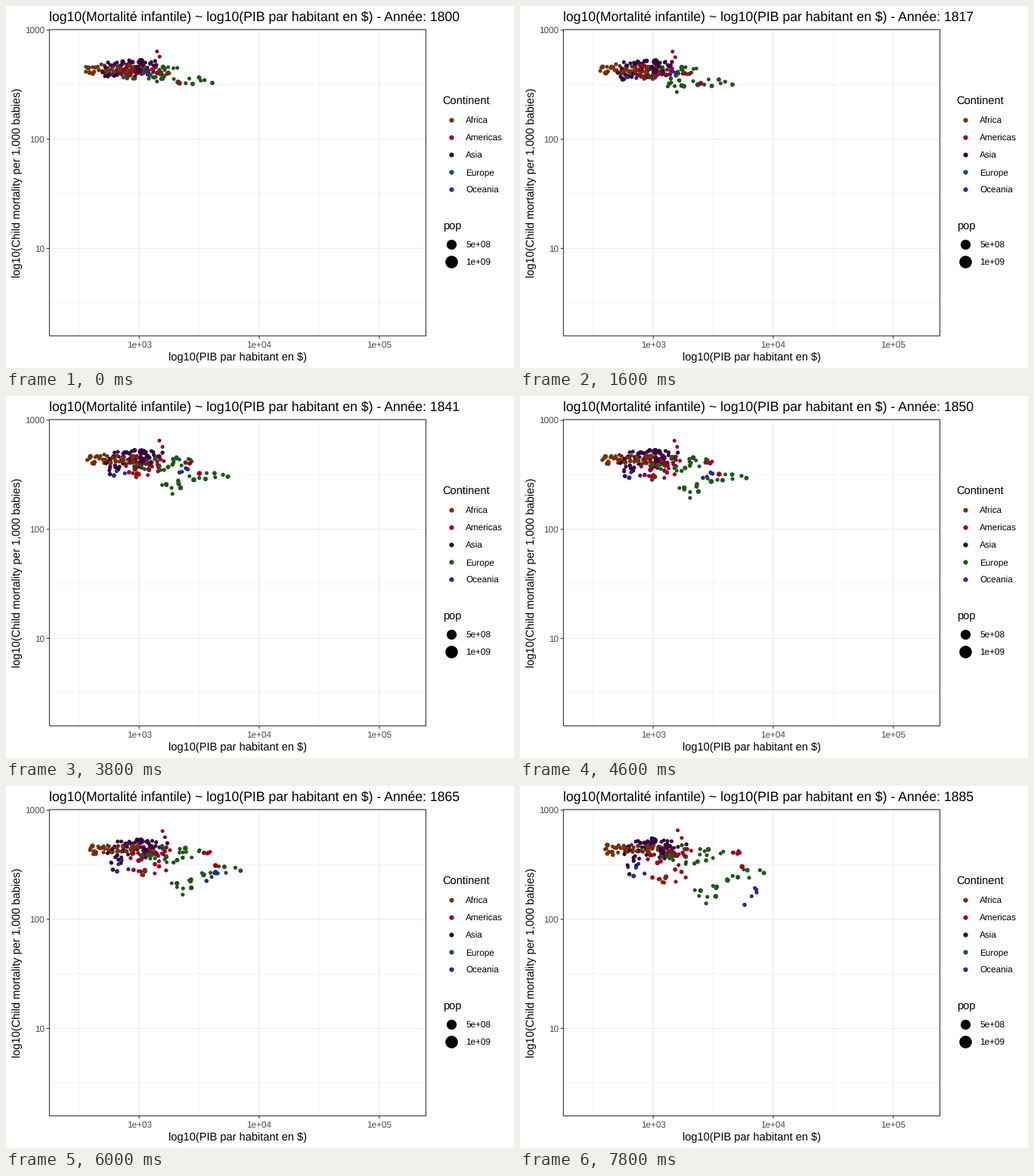
Animation, 672 px wide and 480 px high, one loop 8000 ms. Source, as a matplotlib script:

```python
import numpy as np
import matplotlib.pyplot as plt
from matplotlib.animation import FuncAnimation
from matplotlib.patches import Rectangle

plt.rcParams["font.family"] = "Liberation Sans"
plt.rcParams["text.hinting"] = "none"

W, H, DPI = 672, 480, 96
FRAMES, INTERVAL = 40, 200
LEFT, RIGHT, TOP, BOTTOM = 57.4, 555.5, 31.2, 437.4
X0, DECADE_X = 176.2, 158.8   # pixel of 1e+03, pixels per decade
Y0, DECADE_Y = 32.1, 144.65   # pixel of 1000, pixels per decade
GRID, DARK, GREY = "#EBEBEB", "#333333", "#4D4D4D"
TITLE = "log10(Mortalité infantile) ~ log10(PIB par habitant en $) - Année: {}"

COLORS = {
    "Africa": "#74320A",
    "Americas": "#980024",
    "Asia": "#360044",
    "Europe": "#20581A",
    "Oceania": "#262C8A",
}

rng = np.random.default_rng(1800)
time = np.linspace(0, 1, FRAMES)[:, None]
groups = []  # (paths, radii, colours)


def group(name, n, x, y, dx, dy, lag=1.0, radius=None):
    """Countries starting in box x, y that drift by dx, dy over the loop."""
    def pick(span):
        return rng.uniform(*span, n)

    step = (x[1] - x[0]) / n
    start_x = x[0] + step * (np.arange(n) + rng.random(n))
    wave = np.sin(time * rng.uniform(4, 11, n) + rng.uniform(0, 6.28, n))
    px = start_x + pick(dx) * time ** 1.2 + 0.7 * wave
    py = pick(y) + pick(dy) * time ** lag + 0.5 * wave
    radii = 2.5 + 0.9 * rng.random(n) ** 4 if radius is None else np.full(n, radius)
    groups.append((np.stack([px, py], axis=2), radii, [COLORS[name]] * n))


# The crowd of poor countries, nearly still.
group("Africa", 46, (104, 182), (77, 90), (0, 13), (-3, 3))
group("Asia", 42, (128, 200), (72, 94), (2, 24), (-4, 4))
group("Americas", 20, (150, 198), (76, 92), (8, 34), (-2, 10))
group("Europe", 24, (145, 216), (81, 98), (22, 46), (-6, 14))

# Countries whose child mortality starts to fall.
group("Africa", 3, (156, 166), (86, 90), (22, 32), (26, 42))
group("Asia", 5, (130, 150), (90, 94), (4, 12), (8, 24))
group("Americas", 9, (148, 190), (86, 92), (20, 45), (15, 38), 1.3)
group("Oceania", 5, (128, 154), (83, 93), (8, 16), (16, 30))
group("Europe", 9, (187, 212), (88, 101), (42, 60), (36, 58), 0.9)

# Countries that grow rich; settler colonies improve late.
group("Americas", 5, (198, 218), (88, 90), (72, 92), (-2, 2))
group("Americas", 2, (198, 208), (60, 74), (8, 18), (-2, 2))
group("Europe", 9, (218, 276), (95, 104), (32, 56), (10, 30), 1.3)
group("Europe", 4, (205, 232), (78, 84), (32, 48), (2, 14), 2)
group("Oceania", 5, (176, 190), (86, 91), (116, 130), (44, 78), 2.3)
paths, radii, fills = zip(*groups)
order = rng.permutation(sum(map(len, radii)))

# The most populous countries lie on top.
groups.clear()
group("Americas", 1, (229, 229), (102, 102), (65, 65), (5, 5), 2, radius=3.3)
group("Asia", 1, (176, 176), (86, 86), (11, 11), (0, 0), radius=4.2)
group("Asia", 1, (179, 179), (74, 74), (-1, -1), (-1, -1), radius=4.8)
top_paths, top_radii, top_fills = zip(*groups)

paths = np.concatenate([np.concatenate(paths, axis=1)[:, order], *top_paths], axis=1)
radii = np.concatenate([np.concatenate(radii)[order], *top_radii])
fills = np.concatenate([np.concatenate(fills)[order], *top_fills])


def area(r):
    """Scatter size for a radius in pixels."""
    return (2 * np.asarray(r) * 72 / DPI) ** 2


fig = plt.figure(figsize=(W / DPI, H / DPI), dpi=DPI, facecolor="white")
ax = fig.add_axes([0, 0, 1, 1])
ax.set_xlim(0, W)
ax.set_ylim(H, 0)
ax.axis("off")


def text(x, y, s, size, color="black", **kw):
    return ax.text(x, y, s, fontsize=size, color=color, va="baseline", **kw)


def line(xs, ys, color, px, z=1):
    ax.plot(xs, ys, color=color, lw=px * 72 / DPI, zorder=z,
            solid_capstyle="butt", snap=False)


def dot(x, y, r, color):
    ax.scatter(x, y, s=area(r), c=color, linewidths=0, snap=False)


for k in (-0.5, 0.5, 1.5):
    x = X0 + k * DECADE_X
    line([x, x], [TOP, BOTTOM], GRID, 0.6)
    y = Y0 + (k + 1) * DECADE_Y
    line([LEFT, RIGHT], [y, y], GRID, 0.6)
for k in range(3):
    x = X0 + k * DECADE_X
    line([x, x], [TOP, BOTTOM], GRID, 1.2)
    line([x, x], [BOTTOM, BOTTOM + 3.7], DARK, 1.07, 4)
    text(x, 452.6, f"1e+0{k + 3}", 8.8, GREY, ha="center")
    y = Y0 + k * DECADE_Y
    line([LEFT, RIGHT], [y, y], GRID, 1.2)
    line([LEFT - 3.7, LEFT], [y, y], DARK, 1.07, 4)
    text(50.8, y + 4.2, str(10 ** (3 - k)), 8.8, GREY, ha="right")
ax.add_patch(Rectangle((LEFT, TOP), RIGHT - LEFT, BOTTOM - TOP, fill=False,
                       ec=DARK, lw=0.8, zorder=4, snap=False))

text((LEFT + RIGHT) / 2, 469.6, "log10(PIB par habitant en $)", 11, ha="center")
text(18.8, (TOP + BOTTOM) / 2, "log10(Child mortality per 1,000 babies)", 11,
     ha="center", rotation=90, rotation_mode="anchor")

text(577.6, 131.2, "Continent", 11)
for i, (name, color) in enumerate(COLORS.items()):
    y = 150.8 + 23.04 * i
    dot(589.4, y, 3.1, color)
    text(608.2, y + 4.2, name, 8.8)
text(577.6, 296.2, "pop", 11)
for y, r, label in ((316, 6.6, "5e+08"), (339.1, 8.3, "1e+09")):
    dot(589.4, y, r, "black")
    text(608.2, y + 4.2, label, 8.8)

title = text(LEFT - 0.4, 20, TITLE.format(1800), 13.2)
dots = ax.scatter(*paths[0].T, s=area(radii), c=fills, linewidths=0,
                  zorder=3, snap=False)


def update(i):
    title.set_text(TITLE.format(round(1800 + 2.18 * i)))
    dots.set_offsets(paths[i])
    return title, dots


anim = FuncAnimation(fig, update, frames=FRAMES, interval=INTERVAL,
                     repeat=True, repeat_delay=0)
plt.show()
```
